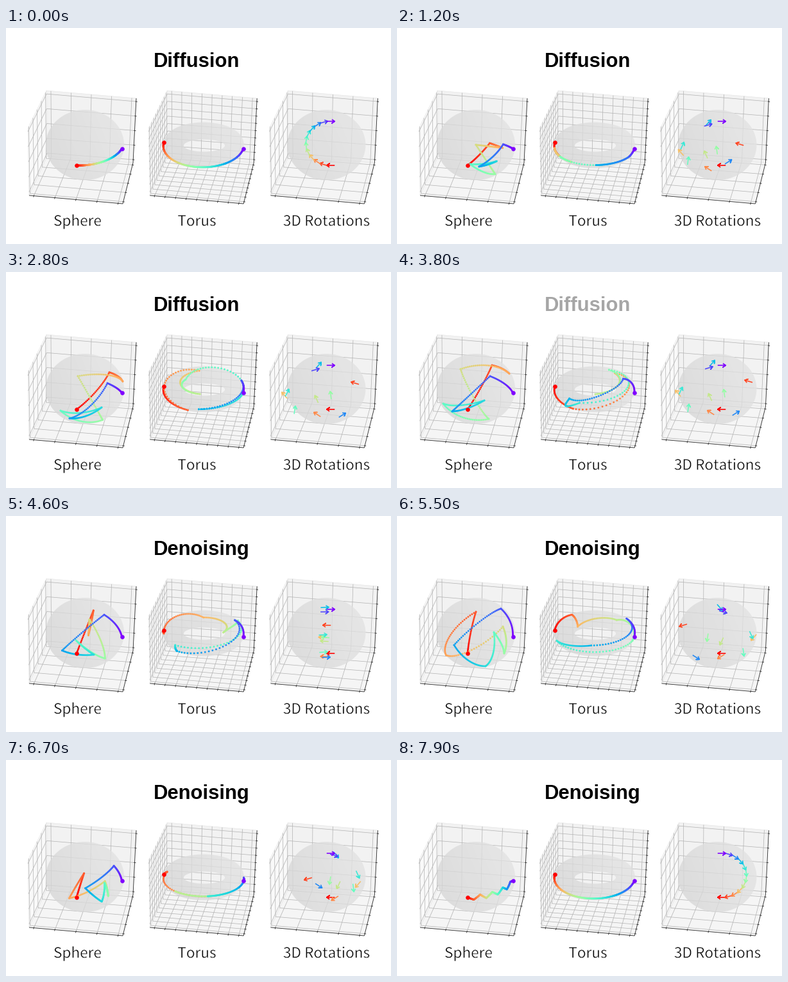
Animation, 600 px wide and 338 px high, one loop 8000 ms. Source, as a matplotlib script:

```python
import numpy as np
import matplotlib.pyplot as plt
from matplotlib.animation import FuncAnimation
from matplotlib.collections import LineCollection
from matplotlib.patches import PathPatch, Polygon
from matplotlib.path import Path
from matplotlib.patheffects import Stroke

W, H, DPI = 600, 338, 64
PX = 72 / DPI                      # points per pixel
FRAMES, STEP = 80, 100
PITCH = 188.2                      # distance between panels
CMAP = plt.get_cmap("rainbow_r")

fig = plt.figure(figsize=(W / DPI, H / DPI), dpi=DPI, facecolor="white")
ax = fig.add_axes((0, 0, 1, 1))
ax.axis("off")


# ---------- static boxes ----------
def lines(segs, color, width, z):
    pts = [np.column_stack((np.real(s), np.imag(s))) for s in segs]
    ax.add_collection(LineCollection(pts, colors=color, linewidths=width * PX, zorder=z))


def draw_box(dx, count):
    """Three walls and three axes; corners are complex x + iy."""
    a, b, c, d = dx + 63 + 98j, dx + 203 + 110j, dx + 34 + 157j, dx + 36 + 262j
    e, f, g = dx + 182 + 275j, dx + 64 + 201j, dx + 198 + 211j
    fr = np.linspace(0.05, 0.95, count)
    grid, axis, ticks = [], [], []
    for p, q, r, s, shade in [(a, c, d, f, "#f9f9f9"), (a, b, g, f, "#f2f2f2"),
                              (f, g, e, d, "#f5f5f5")]:
        quad = np.array([p, q, r, s])
        ax.add_patch(Polygon(np.column_stack((quad.real, quad.imag)), fc=shade,
                             ec="#e4e4e4", lw=0.6 * PX, zorder=1))
        for k in fr:
            grid.append([p + (q - p) * k, s + (r - s) * k])
            grid.append([p + (s - p) * k, q + (r - q) * k])
    lines(grid, "#b4b4b4", 0.75, 2)
    for p, q, tick in [(d, e, -0.5 + 2j), (e, g, 2 + 0.3j), (g, b, 2 + 0.3j)]:
        axis.append([p, q])
        for k in fr:
            m = p + (q - p) * k
            ticks.append([m - 0.6 * tick, m + tick])
    lines(axis + ticks, "#333333", 0.9, 3)


def oval(cx, cy, a, b, r=0, sign=1):
    """Ellipse outline, pushed outwards by r."""
    t = sign * np.linspace(0, 2 * np.pi, 121)
    n = np.array([b * np.cos(t), a * np.sin(t)])
    n = n / np.hypot(*n)
    return Path(np.c_[cx + a * np.cos(t) + r * n[0], cy + b * np.sin(t) + r * n[1]])


def draw_surface(path):
    (x0, y0), (x1, y1) = path.vertices.min(0) - 1, path.vertices.max(0) + 1
    v, u = np.mgrid[-1:1:80j, -1:1:80j]
    shade = 0.862 + 0.022 * u - 0.008 * v
    clip = PathPatch(path, fc="none", ec="none", transform=ax.transData)
    ax.add_patch(clip)
    ax.imshow(shade, cmap="gray", vmin=0, vmax=1, extent=(x0, x1, y1, y0), aspect="auto",
              alpha=0.78, zorder=4, interpolation="bilinear").set_clip_path(clip)


SPHERE_C, SPHERE_R = np.array([123, 183]), np.array([61, 55])
TORUS_C, RING, TUBE, TILT, RISE = np.array([308, 183.5]), 47.5, 15.5, 0.43, 0.9

for i, name in enumerate(("Sphere", "Torus", "3D Rotations")):
    draw_box(i * PITCH, 9 if name == "Torus" else 5)
    if name == "Torus":
        draw_surface(Path.make_compound_path(oval(*TORUS_C, RING, RING * TILT, TUBE),
                                             oval(309, 184, 32, 9.5, sign=-1)))
    else:
        draw_surface(oval(SPHERE_C[0] + i * PITCH, SPHERE_C[1], *SPHERE_R))
    ax.text(111.5 + i * 186 + 8 * (i - 1) * i, 309.5, name, family="Noto Sans CJK JP",
            size=22.6 * PX, ha="center", va="baseline",
            path_effects=[Stroke(linewidth=0.5 * PX, foreground="white")])
title = ax.text(230, 61, "", family="Liberation Sans", weight="bold", size=31 * PX,
                va="baseline")


# ---------- paths ----------
def sphere_curve(nodes, n=30):
    """Great-circle arcs on the front half, through nodes given on screen."""
    p = (nodes - SPHERE_C) / SPHERE_R
    r = np.hypot(*p.T)
    p = p * np.minimum(1, 0.99 / np.maximum(r, 1e-6))[:, None]
    p = np.c_[p, np.sqrt(1 - (p ** 2).sum(1))]
    a, b = p[:-1, None], p[1:, None]
    om = np.arccos(np.clip((a * b).sum(2, keepdims=True), -1, 1)).clip(1e-4)
    s = np.linspace(0, 1, n)[None, :, None]
    q = (np.sin((1 - s) * om) * a + np.sin(s * om) * b) / np.sin(om)
    return SPHERE_C + q[..., :2].reshape(-1, 2) * SPHERE_R


def torus_curve(nodes, n=30):
    """Shortest turns between (ring angle, tube angle) nodes in degrees."""
    d = (np.diff(nodes, axis=0) + 180) % 360 - 180
    s = np.linspace(0, 1, n)[None, :, None]
    th, ph = np.radians(nodes[:-1, None] + s * d[:, None]).reshape(-1, 2).T
    rho = RING + TUBE * np.cos(ph)
    return TORUS_C + np.c_[rho * np.cos(th), TILT * rho * np.sin(th) - RISE * TUBE * np.sin(ph)]


def between(ends, inner):
    return np.vstack((ends[0], inner, ends[-1]))


def mix(a, b, w):
    return a + (b - a) * w


class Track:
    """Nodes moving in straight lines between timed poses."""

    def __init__(self, *poses):
        self.times = [t for t, _ in poses]
        self.poses = np.array([p for _, p in poses])

    def __call__(self, t):
        k = min(np.searchsorted(self.times, t, "right") - 1, len(self.times) - 2)
        w = (t - self.times[k]) / (self.times[k + 1] - self.times[k])
        return mix(self.poses[k], self.poses[k + 1], w)


# sphere: calm arc -> noisy -> another noisy pose -> slightly rough arc
arc = sphere_curve(np.array([(110, 215), (180.5, 189)]), 10)
noisy = between(arc, [(148, 146), (175, 159), (99, 152), (143, 230),
                      (72, 206), (136, 201), (86, 218), (145, 163)])
fresh = between(arc, [(123, 150), (76, 218), (165, 173), (167, 215),
                      (151, 182), (138, 235), (89, 202), (162, 145)])
early = between(arc, noisy[1:-1] + (13, 11))
rough = arc + 4 * np.sin(np.pi * np.arange(10))[:, None]
rough[1:-1, 1] += 3.5 * np.cos(np.pi * np.arange(8))
sphere_at = Track((0, arc), (1200, mix(arc, early, 0.6)), (2800, early), (3800, noisy),
                  (5500, fresh), (6700, mix(fresh, arc, 0.42)), (7900, rough))


# torus
def torus_arc(depth):
    s = np.linspace(0, 1, 9)
    return np.c_[190 - 179 * s, -depth * np.sin(np.pi * s)]


def wrap(turns, tube):
    return between(torus_arc(0), np.c_[turns, np.full(7, tube)])


def loops(*inner):
    return between(torus_arc(0), inner)


torus_at = Track(
    (0, torus_arc(40)),
    (1200, wrap([150, 180, 125, 150, 30, 88, 30], -18)),
    (2800, loops((115, -45), (260, 120), (100, 150), (215, 150), (11, 0), (97, -20), (345, 30))),
    (3800, loops((125, -45), (318, 110), (88, 150), (300, 100), (112, 15), (172, 240), (352, 100))),
    (5500, loops((225, 80), (215, 170), (330, 120), (20, -10), (160, -10), (95, 30), (330, 50))),
    (6700, wrap([205, 75, 135, 52, 84, 30, 355], -12)),
    (7900, torus_arc(32)))
torus_at.poses = np.unwrap(torus_at.poses, axis=0, period=360)


# rotations: (x, y, heading) rows
def arrow_arc(turn):
    """Arrows along a half circle, each heading clockwise."""
    deg = -90 + np.linspace(0, turn, 12)
    a = np.radians(deg)
    return np.c_[506 + 38.5 * np.cos(a), 180.5 - 34.5 * np.sin(a), deg - 90]


left, right = arrow_arc(-180), arrow_arc(180)
left[:, 2] += 360
right[:, 2] += 360
spread = left.copy()
spread[1:-1, :2] = [(548, 171), (489, 220), (438, 190), (488, 196), (510, 190),
                    (454, 213), (442, 186), (491, 143), (528, 221), (486, 150)]
mirrored = right.copy()
mirrored[1:-1, 0] = 994 - spread[1:-1, 0]
mirrored[1:-1, 1] = spread[1:-1, 1]
drift = spread.copy()
drift[1:-1, 0] -= 4
drift[1:-1, 1] += 3
arrows_at = Track((0, left), (1200, mix(left, drift, 0.8)), (2800, drift), (3800, spread),
                  (5500, mirrored), (6700, mix(mirrored, right, 0.35)), (7900, right))
# both sweeps end at the same heading, one turn apart
arrows_at.poses[..., 2] = np.unwrap(arrows_at.poses[..., 2], axis=0, period=360)


def arrow_shapes(nodes, length=12.5, barb=5.2):
    mid, a = nodes[:, :2], np.radians(nodes[:, 2])

    def ray(turn, size):
        return size * np.c_[np.cos(a + turn), -np.sin(a + turn)]

    tip = mid + ray(0, length / 2)
    tail = mid - ray(0, length / 2)
    return np.stack((tail, tip, tip - ray(0.6, barb), tip, tip - ray(-0.6, barb)), axis=1)


# ---------- moving artists ----------
def dotted(curve, width=2.9):
    pts = ax.scatter(*curve.T, s=(width * PX) ** 2, c=CMAP(np.linspace(0, 1, len(curve))),
                     linewidths=0, zorder=6)
    for tip, tone in ((curve[0], 0.0), (curve[-1], 1.0)):
        ax.scatter(*tip, s=(6.6 * PX) ** 2, color=CMAP(tone), linewidths=0, zorder=7)
    return pts


sphere_dots = dotted(sphere_curve(sphere_at(0)))
torus_dots = dotted(torus_curve(torus_at(0)))
arrows = LineCollection(arrow_shapes(arrows_at(0)), colors=CMAP(np.linspace(0, 1, 12)),
                        linewidths=1.6 * PX, zorder=6)
ax.add_collection(arrows)
ax.set_xlim(0, W)
ax.set_ylim(H, 0)


def update(i):
    t = i * STEP
    sphere_dots.set_offsets(sphere_curve(sphere_at(t)))
    torus_dots.set_offsets(torus_curve(torus_at(t)))
    arrows.set_segments(arrow_shapes(arrows_at(t)))
    if t < 4050:
        title.set_text("Diffusion")
        title.set_alpha(float(np.clip((3940 - t) / 400, 0, 1)))
    else:
        title.set_text("Denoising")
        title.set_alpha(float(np.clip((t - 4150) / 450, 0, 1)))
    return sphere_dots, torus_dots, arrows, title


anim = FuncAnimation(fig, update, frames=FRAMES, interval=STEP, repeat=True, repeat_delay=0)
plt.show()
```
